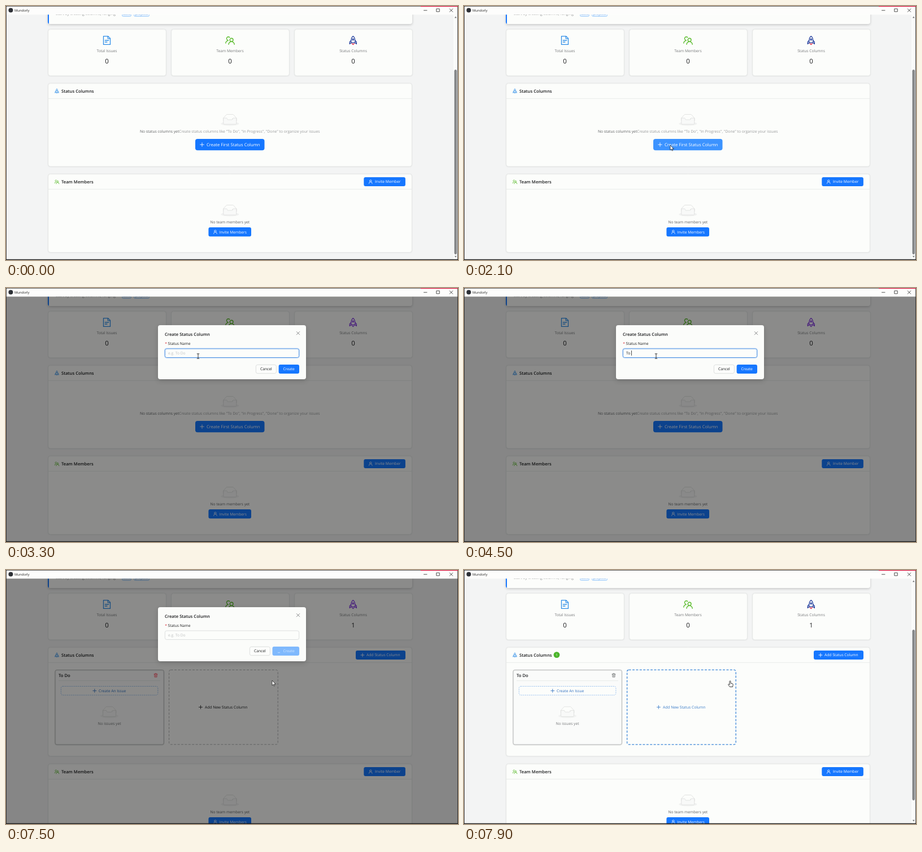
An HTML page with a canvas for the animation above (8000 ms loop, 800 by 451 pixels).

```html
<!DOCTYPE html>
<html lang="en">
<head>
<meta charset="utf-8">
<title>Status board</title>
<style>
html, body { margin: 0; width: 100%; height: 100%; overflow: hidden; background: #f3f4f4; }
canvas { display: block; width: 800px; height: 451px; }
</style>
</head>
<body>
<canvas id="stage"></canvas>
<script>
const W = 800, H = 451, LOOP = 8000, STEP = 100;
const cv = document.getElementById('stage'), c = cv.getContext('2d');
const dpr = window.devicePixelRatio || 1;
cv.width = W * dpr;
cv.height = H * dpr;

const BLUE = '#1677ff', INK = '#1c1d1f', GREY = '#77797b', CARD = '#fcfdfb', LINE = '#e6e8e7';
const SMALL = 6.69, BIG = 7.64;
const OPEN = 2130, FOCUS = 2900, CLICK = 6650, SAVED = 7450, CLOSE = 7580, GONE = 7780;

const clamp = v => Math.max(0, Math.min(1, v));
const prog = (t, a, b) => clamp((t - a) / (b - a));
const mix = (a, b, p) => a + (b - a) * p;
const ease = p => p * p * (3 - 2 * p);
const hoverBlue = p => `rgb(${mix(22, 64, p)},${mix(119, 150, p)},255)`;

function text(s, x, y, size = SMALL, color = INK, weight = 400, align = 'left') {
  c.font = `${weight} ${size}px "Open Sans", sans-serif`;
  c.textAlign = align;
  c.fillStyle = color;
  c.fillText(s, x, y);
}

function box(x, y, w, h, r, fill, stroke, lw = 1) {
  c.beginPath();
  c.roundRect(x, y, w, h, r);
  if (fill) { c.fillStyle = fill; c.fill(); }
  if (stroke) { c.strokeStyle = stroke; c.lineWidth = lw; c.stroke(); }
}

function path(d, x, y, stroke, lw = 1, fill, scale = 1) {
  c.save();
  c.translate(x, y);
  c.scale(scale, scale);
  c.lineWidth = lw;
  c.lineJoin = c.lineCap = 'round';
  const p = new Path2D(d);
  if (fill) { c.fillStyle = fill; c.fill(p); }
  if (stroke) { c.strokeStyle = stroke; c.stroke(p); }
  c.restore();
}

function shadow(blur, dy, alpha, draw) {
  c.save();
  c.shadowColor = `rgba(0,0,0,${alpha})`;
  c.shadowBlur = blur * dpr;
  c.shadowOffsetY = dy * dpr;
  draw();
  c.restore();
}

const card = (x, y, w, h) =>
  shadow(2, 0.5, 0.06, () => box(x + .5, y + .5, w - 1, h - 1, 4, CARD, LINE));

const plus = (x, y, color, r = 3) => path(`M${-r} 0H${r}M0 ${-r}V${r}`, x, y, color, 0.85);
const user = (x, y, color) =>
  path('M-1.7-1.4a1.7 1.7 0 1 0 3.4 0a1.7 1.7 0 1 0-3.4 0M-2.9 3.2a2.9 2.9 0 0 1 5.8 0', x, y, color, 0.75);
const fileIcon = (x, y, color) =>
  path('M-6-7.4H2.2L6-3.6V7.4H-6ZM1.8-7.2V-3.2H6M-3.2 0H3.2M-3.2 3H.4', x, y, color, 1.3);
const team = (x, y, color, scale, lw) =>
  path('M.2-.8a2.9 2.9 0 1 0 5.8 0a2.9 2.9 0 1 0-5.8 0M-2 7.3a5.1 5.1 0 0 1 10.2 0M-.2-5.2a3 3 0 1 0-3.6 4.6M-7.2 5a5.2 5.2 0 0 1 4.6-4.6',
    x - .5 * scale, y, color, lw, null, scale);

function rocket(x, y, color, flame, scale, lw) {
  path('M0-7.4C-3-5-3.6-2.4-3.6 4.2H3.6C3.6-2.4 3-5 0-7.4ZM-3.6.2L-6 2.6V6.4L-3.6 4.2M3.6.2L6 2.6V6.4L3.6 4.2M-1.2-1.6a1.2 1.2 0 1 0 2.4 0a1.2 1.2 0 1 0-2.4 0',
    x, y, color, lw, null, scale);
  path('M-2.2 5.4L0 7.6L2.2 5.4', x, y, flame, lw, null, scale);
}

function emptyBox(x, y) {
  c.fillStyle = '#f1f2f1';
  c.beginPath();
  c.ellipse(x, y + 17, 16, 3.5, 0, 0, Math.PI * 2);
  c.fill();
  path('M55 13.8L44.9 2.3C44.4 1.5 43.7 1 42.9 1H21.1c-.7 0-1.5.5-1.9 1.3L9 13.8V23h46z', x - 16, y, '#d5d7d6', 1.3, CARD, .5);
  path('M41.6 17c0-1.6 1-3 2.2-3H55v18.1c0 2.1-1.3 3.9-3 3.9H12c-1.7 0-3-1.7-3-3.9V14h11.2c1.2 0 2.2 1.3 2.2 3 0 1.6 1 2.9 2.2 2.9h14.8c1.2 0 2.2-1.3 2.2-2.9z',
    x - 16, y, '#d5d7d6', 1.3, '#f8f9f8', .5);
}

function button(x, y, w, h, label, tx, icon, fill = BLUE) {
  box(x, y, w, h, h > 18 ? 4 : 3, fill);
  const big = h > 18, cy = y + h / 2;
  if (icon) icon(x + 12, cy, '#fff', big ? 3.3 : 3);
  text(label, tx, cy + (big ? 2.8 : 2.4), big ? BIG : SMALL, '#fff');
}

function dashed(x, y, w, h, color, dash, lw) {
  c.setLineDash(dash);
  box(x, y, w, h, 3, null, color, lw);
  c.setLineDash([]);
}

function section(y, h, title, icon) {
  card(74, y, 645, h);
  c.fillStyle = LINE;
  c.fillRect(75, y + 27.3, 643, 0.9);
  icon(90, y + 14.6);
  text(title, 98, y + 17.2, BIG, INK, 600);
}

function banner() {
  shadow(4, 1.5, 0.2, () => box(74, 0, 645, 32, 4, CARD));
  c.save();
  c.beginPath();
  c.roundRect(74, 0, 645, 32, 4);
  c.clip();
  c.fillStyle = BLUE;
  c.fillRect(74, 0, 2, 32);
  c.restore();
  text('Start by creating columns, ranging', 88, 15.6, SMALL, GREY);
  for (const [x, w, s] of [[205, 17, 'tasks'], [226, 28, 'projects']]) {
    box(x + .5, 8.5, w - 1, 10, 2, '#e4f1ff', '#8fc4fa', .8);
    text(s, x + w / 2, 15.6, 6, '#3d87d8', 400, 'center');
  }
}

function stats(dim, count) {
  const items = [['Total Issues', '0'], ['Team Members', '0'], ['Status Columns', count]];
  items.forEach(([label, n], i) => {
    const x = 74 + i * 218;
    card(x, 40.5, 210, 84);
    text(label, x + 104.5, 82.2, SMALL, GREY, 400, 'center');
    text(n, x + 104.5, 102.2, 11.4, INK, 500, 'center');
  });
  fileIcon(178.5, 61, '#2f8ee8');
  team(396.5, 61, '#5cbc2e', 1, 1.4);
  rocket(614.3, 61, dim ? '#8338e0' : '#1f3c9c', dim ? '#8338e0' : '#e0203c', 1, 1.3);
}

function columns(t, dim) {
  button(619, 143, 88, 16, 'Add Status Column', 638, plus);
  shadow(2, .5, .12, () => box(87, 177.5, 192.4, 132.5, 3, '#fafbfa', '#b9bbbb'));
  c.fillStyle = '#e3e5e4';
  c.fillRect(93, 196.3, 180, .8);
  text('To Do', 93, 190, BIG, INK, 600);
  path('M-3-2H3M-1.2-2V-3.2H1.2V-2M-2.3-2L-2 3.2H2L2.3-2M-.7 0V1.6M.7 0V1.6', 265, 187, dim ? '#ff4358' : '#66686a', .75);
  c.fillStyle = CARD;
  c.fillRect(97, 206.5, 172, 15.5);
  dashed(97.4, 206.5, 171.4, 15.6, '#7fb1ec', [2, 1.4], .8);
  plus(156.8, 214.4, '#2f6fc0');
  text('Create An Issue', 164, 216.8, SMALL, '#2f6fc0');
  emptyBox(183, 242.3);
  text('No issues yet', 183, 275, SMALL, GREY, 400, 'center');

  const over = t >= GONE - 100;
  dashed(288.6, 177.4, 192.6, 132.4, over ? '#3f88d8' : '#b0b2b2', [4, 2.4], over ? 1.3 : 1);
  plus(344.5, 243.5, over ? '#3a7cc8' : INK);
  text('Add New Status Column', 352, 246, SMALL, over ? '#3a7cc8' : INK);

  const pop = ease(prog(t, CLOSE - 30, GONE));
  if (pop > 0) {
    c.save();
    c.translate(164, 150.6);
    c.scale(pop, pop);
    box(-5.4, -5.4, 10.8, 10.8, 5.4, '#4bb52a');
    text('1', 0, 2.2, 6, '#fff', 400, 'center');
    c.restore();
  }
}

function noColumns(t) {
  emptyBox(396.3, 192);
  const lead = 'No status columns yet';
  text(lead, 237, 225.2, SMALL, '#5e6062');
  const w = c.measureText(lead).width;
  text('Create status columns like "To Do", "In Progress", "Done" to organize your issues', 237 + w, 225.2, SMALL, '#97999a');
  const hover = t < 2150 ? prog(t, 1880, 2050) * .9 : 0;
  button(335, 236, 122.5, 20.3, 'Create First Status Column', 355, plus, hoverBlue(hover));
}

function page(t, dim) {
  const saved = t >= SAVED, dy = saved ? 46 : 0;
  c.fillStyle = '#f3f4f4';
  c.fillRect(0, 0, W, H);
  banner();
  stats(dim, saved ? '1' : '0');
  section(136.5, saved ? 194.5 : 149, 'Status Columns', (x, y) => rocket(x, y, '#2f8ee8', '#2f8ee8', .52, 1.5));
  if (saved) columns(t, dim); else noColumns(t);
  section(297.5 + dy, 140.5, 'Team Members', (x, y) => team(x, y, '#5cbc2e', .5, 1.6));
  button(633.3, 304 + dy, 73.6, 16, 'Invite Member', 653, user);
  emptyBox(396.3, 353 + dy);
  text('No team members yet', 396.3, 386 + dy, SMALL, '#5e6062', 400, 'center');
  button(358.4, 393 + dy, 75.6, 16.2, 'Invite Members', 377.3, user);
  if (!dim) scrollbar(saved);
}

function scrollbar(saved) {
  c.fillStyle = '#fafbfa';
  c.fillRect(792, 15, 8, H);
  box(793.4, saved ? 106 : 113, 4.6, saved ? 303 : 328, 2.3, '#86888a');
  path('M-2 1.2L0-1.4L2 1.2Z', 795.8, 20, null, 1, '#77797b');
  path('M-2-1.2L0 1.4L2-1.2Z', 795.8, 445, null, 1, '#77797b');
}

// Typed characters with the time of each key press
const KEYS = [['T', 3900], ['o', 4100], [' ', 4400], ['D', 4800], ['o', 5000]];

function input(t) {
  const focus = t >= FOCUS && t < CLICK;
  const value = t >= SAVED ? '' : KEYS.filter(k => t >= k[1]).map(k => k[0]).join('');
  if (focus) box(280.4, 107, 239, 17.4, 4, null, 'rgba(5,110,255,.14)', 1.6);
  box(281.4, 107.9, 237.2, 15.6, 3, CARD, focus ? '#4a8fe0' : '#d6d8d8', focus ? 1 : .8);
  if (value) text(value, 287, 118, SMALL, INK);
  else text('e.g. To Do', 287, 118, SMALL, '#bfc1c1');
  if (!focus) return;
  const typing = t > 3800 && t < 5300;
  if (typing || (t - 5300 + 10000) % 1000 >= 0 && Math.floor((t - 5400 + 10000) / 500) % 2 === 0) {
    const w = value ? c.measureText(value).width : 0;
    c.fillStyle = INK;
    c.fillRect(287.2 + w, 111, .8, 9);
  }
}

function modal(t) {
  shadow(8, 3, .16, () => box(269, 66, 262, 96, 4, '#fbfcfa'));
  text('Create Status Column', 281, 85.2, BIG, INK, 600);
  path('M-2.7-2.7L2.7 2.7M2.7-2.7L-2.7 2.7', 517, 80.2, '#7d7f80', .9);
  text('*', 281.2, 101, SMALL, '#d8343a');
  text('Status Name', 286.6, 100.6);
  input(t);

  const busy = t >= CLICK, cx = busy ? 431 : 442;
  box(cx + .4, 136.3, 36, 15.4, 3, CARD, '#d6d8d8', .8);
  text('Cancel', cx + 18.4, 146.3, SMALL, INK, 400, 'center');
  c.save();
  if (busy) c.globalAlpha *= .66;
  const over = busy ? 1 : prog(t, 6100, 6300);
  box(busy ? 471.5 : 482.6, 136, busy ? 47.6 : 36.4, 16, 3, hoverBlue(over));
  text('Create', 490.4, 146.3, SMALL, '#fff');
  if (busy) {
    const a = t / 1000 * Math.PI * 2 - Math.PI * .75;
    c.beginPath();
    c.arc(483, 144, 2.9, a, a + Math.PI / 2);
    c.strokeStyle = '#fff';
    c.lineWidth = .8;
    c.stroke();
  }
  c.restore();
}

function overlay(t) {
  if (t < OPEN || t >= GONE) return;
  const zoomIn = Math.sqrt(1 - (1 - prog(t, OPEN, OPEN + 200)) ** 2);
  const out = ease(prog(t, CLOSE, GONE));
  c.fillStyle = `rgba(0,0,0,${.45 * zoomIn * (1 - out)})`;
  c.fillRect(0, 0, W, H);
  const s = mix(.2, 1, zoomIn * (1 - out));
  c.save();
  c.globalAlpha = zoomIn * (1 - out);
  c.translate(366, 250);
  c.scale(s, s);
  c.translate(-366, -250);
  modal(t);
  c.restore();
}

function frame() {
  c.fillStyle = '#fdfdfc';
  c.fillRect(0, 0, W, 15.3);
  c.fillStyle = '#2d3036';
  c.beginPath();
  c.arc(8.4, 7.6, 4, 0, Math.PI * 2);
  c.fill();
  text('Mundorly', 15, 10, 5.9, '#222');
  path('M0 0H5.5', 739.5, 7.8, '#222', .8);
  path('M0 0H5V5H0Z', 762.2, 5, '#222', .8);
  path('M0 0L5.4 5.4M5.4 0L0 5.4', 785.3, 5, '#222', .8);
  c.fillStyle = '#1b1b1b';
  c.fillRect(0, 0, W, .7);
  c.fillRect(0, 0, .8, H);
  c.fillRect(W - .8, 0, .8, H);
  c.fillRect(0, H - 1.3, W, 1.3);
  c.fillStyle = '#d8143c';
  c.fillRect(734, 0, 66, 1.2);
}

const TRAIL = [
  [1850, 372, 450], [2000, 365, 247.5], [2120, 365, 247.5], [2300, 346.8, 197.5], [2800, 340, 121],
  [5700, 340, 121], [6300, 498.3, 146], [6700, 498.3, 146], [7300, 471, 196.5], [LOOP, 471, 196.5]
];

function cursor(t) {
  if (t < TRAIL[0][0]) return;
  const i = TRAIL.findIndex(k => t < k[0]);
  const [a, x0, y0] = TRAIL[i - 1], [b, x1, y1] = TRAIL[i];
  const p = ease(prog(t, a, b)), x = mix(x0, x1, p), y = mix(y0, y1, p);
  const inField = t > OPEN && t < GONE && x < 519 && y > 107 && y < 124;
  const onCreate = t > 6000 && t < CLICK && x > 482 && y > 136;
  if (inField) {
    path('M-1.8-4.2H-.5M.5-4.2H1.8M0-3.8V3.8M-1.8 4.2H-.5M.5 4.2H1.8', x, y, '#222', .9);
  } else if (onCreate || t >= GONE - 80) {
    path('M-1 1Q0-.7 1 1V4.6L4.2 5.4Q5.4 5.8 5.2 7.2L4.4 11H-.6L-3.4 7Q-3.2 5.4-1.6 6.4L-1 7Z', x, y, '#1d1d1d', .85, '#fff');
  } else {
    path('M0 0V8.4L2 6.6L3.3 9.6L4.6 9L3.3 6.2H6Z', x, y, '#1d1d1d', .75, '#fff');
  }
}

function draw(t) {
  c.setTransform(dpr, 0, 0, dpr, 0, 0);
  c.textBaseline = 'alphabetic';
  c.textRendering = 'geometricPrecision';
  page(t, t >= OPEN && t < GONE);
  overlay(t);
  frame();
  cursor(t);
}

const start = performance.now();
function tick() {
  const t = (performance.now() - start) % LOOP;
  draw(Math.floor(t / STEP) * STEP);
  requestAnimationFrame(tick);
}
tick();
</script>
</body>
</html>
```
